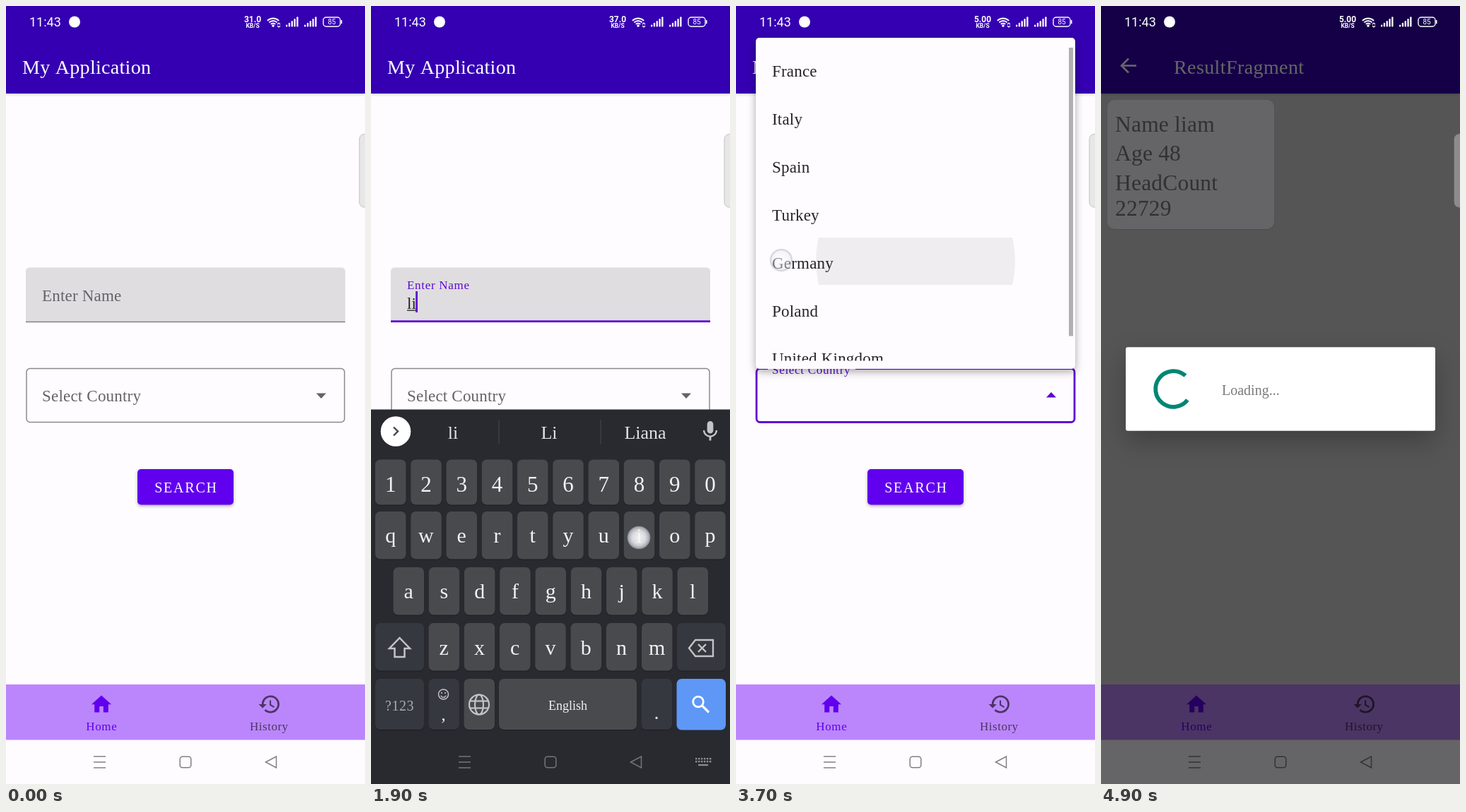
An HTML page with a canvas for the animation above (5 s loop, 508 by 1102 pixels).

```html
<!DOCTYPE html>
<html lang="en">
<head>
<meta charset="utf-8">
<title>Name search</title>
<style>
html, body { margin: 0; width: 100%; height: 100%; overflow: hidden; background: #fefcff; }
canvas { display: block; width: 508px; height: 1102px; }
</style>
</head>
<body>
<canvas id="stage"></canvas>
<script>
const W = 508, H = 1102, LOOP = 5000, STEP = 100;
const canvas = document.getElementById('stage');
const c = canvas.getContext('2d');
const ratio = window.devicePixelRatio || 1;
canvas.width = W * ratio;
canvas.height = H * ratio;

const SERIF = '"Liberation Serif", serif';
const SANS = 'Roboto, sans-serif';
const PAPER = '#fefcff', HEADER = '#3500b1', PURPLE = '#6000ee';
const FOCUS = '#5f08d2', GREY = '#656367', INK = '#252427', KEYICON = '#c3c4c7';
const NAME = 'liam';
const COUNTRIES = ['France', 'Italy', 'Spain', 'Turkey', 'Germany', 'Poland', 'United Kingdom'];
const TYPED_AT = [1700, 1900, 2100, 2300];

// x, y, first and last full-strength time; fades one step later
const TOUCHES = [
  [200, 415, 800, 900],
  [455, 831, 1700, 1700], [379, 753, 1900, 1900], [53, 831, 2100, 2100], [404, 910, 2300, 2300],
  [390, 1075, 2600, 2600], [250, 552, 3000, 3100], [64, 360, 3600, 3600], [254, 682, 4400, 4400]
];

const HOME = new Path2D('M10 20v-6h4v6h5v-8h3L12 3 2 12h3v8z');
const HISTORY = new Path2D('M13 3a9 9 0 0 0-9 9H1l3.9 3.9.1.1L9 12H6a7 7 0 1 1 2.06 4.94l-1.42 1.42A9 9 0 1 0 13 3zm-1 5v5l4.28 2.54.72-1.21-3.5-2.08V8z');
const MIC = new Path2D('M12 14a3 3 0 0 0 3-3V5a3 3 0 0 0-6 0v6a3 3 0 0 0 3 3zm5.3-3c0 3-2.54 5.1-5.3 5.1S6.7 14 6.7 11H5c0 3.4 2.7 6.2 6 6.7V21h2v-3.3c3.3-.5 6-3.3 6-6.7z');

const clamp = v => Math.max(0, Math.min(1, v));
const ramp = (t, a, b) => clamp((t - a) / (b - a));
const mix = (a, b, p) => a + (b - a) * p;
const typedName = t => NAME.slice(0, TYPED_AT.filter(at => t >= at).length);

function track(t, keys) {
  let value = keys[0][1];
  for (let i = 1; i < keys.length; i++) {
    const [a, from] = keys[i - 1], [b, to] = keys[i];
    if (t >= a) value = mix(from, to, ramp(t, a, b));
  }
  return value;
}

function text(s, x, y, size, color, o = {}) {
  c.font = `${o.weight || 400} ${size}px ${o.family || SERIF}`;
  c.letterSpacing = (o.gap || 0) + 'px';
  c.textAlign = o.align || 'left';
  c.fillStyle = color;
  c.fillText(s, x, y);
}

function rect(x, y, w, h, color) {
  c.fillStyle = color;
  c.fillRect(x, y, w, h);
}

function box(x, y, w, h, r, color) {
  c.beginPath();
  c.roundRect(x, y, w, h, r);
  c.fillStyle = color;
  c.fill();
}

function disc(x, y, r, color) {
  c.beginPath();
  c.arc(x, y, r, 0, 7);
  c.fillStyle = color;
  c.fill();
}

function ring(x, y, r, color, width) {
  c.beginPath();
  c.arc(x, y, r, 0, 7);
  stroke(color, width);
}

function stroke(color, width) {
  c.strokeStyle = color;
  c.lineWidth = width;
  c.stroke();
}

function line(points, color, width, close) {
  c.beginPath();
  for (let i = 0; i < points.length; i += 2) c.lineTo(points[i], points[i + 1]);
  if (close) c.closePath();
  stroke(color, width);
}

function icon(path, x, y, scale, color) {
  c.save();
  c.translate(x, y);
  c.scale(scale, scale);
  c.translate(-12, -12);
  c.fillStyle = color;
  c.fill(path);
  c.restore();
}

function shadowed(blur, dy, color, draw) {
  c.save();
  c.shadowColor = color;
  c.shadowBlur = blur * ratio;
  c.shadowOffsetY = dy * ratio;
  draw();
  c.restore();
}

function statusBar(t) {
  const speed = t < 900 ? '31.0' : t < 3100 ? '37.0' : '5.00';
  const white = '#fff';
  text('11:43', 33, 29, 18, white, { family: SANS });
  disc(97, 22.5, 8, white);
  text(speed, 349, 23, 12, white, { family: SANS, weight: 700, align: 'center' });
  text('KB/S', 349, 31, 8.5, white, { family: SANS, weight: 700, align: 'center' });
  for (const r of [4.5, 8, 11.5]) {
    c.beginPath();
    c.arc(378, 29, r, -Math.PI * 0.75, -Math.PI * 0.25);
    stroke(white, 2);
  }
  disc(378, 28, 1.8, white);
  line([384, 26, 386, 24, 388, 26], white, 1.2);
  line([384, 28, 386, 30, 388, 28], white, 1.2);
  for (const x of [396, 422])
    for (let i = 0; i < 5; i++) box(x + i * 3.8, 26.5 - i * 2.8, 2.3, 3 + i * 2.8, 1, white);
  c.beginPath();
  c.roundRect(449, 16, 24, 13, 4);
  stroke(white, 1.4);
  rect(474, 20, 1.5, 5, white);
  text('85', 461, 26.3, 10, white, { family: SANS, align: 'center' });
}

function header(result) {
  shadowed(4, 1, 'rgba(0,0,0,.2)', () => rect(0, 0, W, 124, HEADER));
  if (!result) return text('My Application', 23, 96, 28, '#fff', { gap: 0.3 });
  line([50, 84.5, 29, 84.5], '#fff', 2.6);
  line([39, 74.5, 29, 84.5, 39, 94.5], '#fff', 2.6);
  text('ResultFragment', 103, 96, 28, '#fff', { gap: 0.4 });
}

function floatLabel(s, p, y0, y1, color) {
  text(s, 51, mix(y0, y1, p), mix(23, 17, p), color, { gap: mix(0.2, 0.7, p) });
}

function nameField(t) {
  const focused = t >= 900 && t < 3200;
  const typed = typedName(t);
  box(28, 370.5, 452, 77.5, [5, 5, 0, 0], '#dfdde0');
  if (focused) rect(28, 445.3, 452, 2.8, FOCUS);
  else rect(28, 446.7, 452, 1.5, '#828083');
  floatLabel('Enter Name', ramp(t, 850, 1000), 417.5, 400.5, focused ? FOCUS : GREY);
  text(typed, 51, 429, 23, INK, { gap: 0.2 });
  const width = typed ? c.measureText(typed).width : 0;
  if (typed && t < 2700) rect(51, 430.5, width, 1.3, INK);
  if (focused) rect(51 + (typed ? Math.max(0, width - 1) : 0), 404, 2.8, 30, FOCUS);
}

function countryField(t) {
  const focused = t >= 3200;
  const lift = ramp(t, 3150, 3300);
  const color = focused ? FOCUS : GREY;
  c.beginPath();
  c.roundRect(29, 513.5, 450, 76, 5);
  stroke(focused ? FOCUS : '#8b898d', focused ? 2.8 : 1.5);
  if (lift) rect(mix(107, 45, lift), 511, 124 * lift, 6, PAPER);
  floatLabel('Select Country', lift, 560, 521, color);
  if (t >= 3800) text('Germany', 51, 561, 23, INK, { gap: 0.4 });
  const up = t >= 3200 && t < 3900;
  c.beginPath();
  c.moveTo(439, up ? 554.5 : 548.5);
  c.lineTo(453, up ? 554.5 : 548.5);
  c.lineTo(446, up ? 547 : 556);
  c.fillStyle = color;
  c.fill();
}

function searchButton(t) {
  shadowed(4, 2, 'rgba(0,0,0,.3)', () => box(186, 656, 136, 50.5, 5, PURPLE));
  if (t >= 4400) {
    c.save();
    c.beginPath();
    c.roundRect(186, 656, 136, 50.5, 5);
    c.clip();
    disc(254, 681, 45 + (t - 4400) * 0.4, 'rgba(255,255,255,.22)');
    c.restore();
  }
  text('SEARCH', 255, 688.5, 20, '#fff', { gap: 1.8, align: 'center' });
}

function dropdown(t) {
  const alpha = ramp(t, 3150, 3350) * (1 - ramp(t, 3800, 3950));
  if (!alpha) return;
  c.save();
  c.globalAlpha = alpha;
  shadowed(12, 4, 'rgba(0,0,0,.34)', () => box(28, 45, 452, 469, 5, PAPER));
  c.beginPath();
  c.rect(28, 58, 452, 444.5);
  c.clip();
  if (t >= 3700) {
    c.save();
    c.beginPath();
    c.rect(28, 328, 452, 67);
    c.clip();
    disc(254, 361, 141 + (t - 3700) * 1.4, '#efedf0');
    c.restore();
  }
  COUNTRIES.forEach((s, i) => text(s, 51, 100 + i * 67.9, 23, INK, { gap: 0.2 }));
  rect(471, 59, 6, 408.5, '#b1afb2');
  c.restore();
}

function tabs() {
  rect(0, 961, W, 78.5, '#bb86fc');
  icon(HOME, 135, 989.2, 1.4, PURPLE);
  text('Home', 135.3, 1026, 17, PURPLE, { gap: 0.6, align: 'center' });
  icon(HISTORY, 373, 989, 1.4, '#4b3565');
  text('History', 372.3, 1026, 17, '#4b3565', { gap: 0.5, align: 'center' });
}

function systemKeys(t) {
  const v = Math.round(track(t, [[1200, 128], [1300, 60], [1400, 26], [1700, 118],
    [2600, 118], [2700, 238], [2800, 244], [3100, 128]]));
  const color = `rgb(${v},${v},${v + 2})`;
  for (const y of [1063, 1071, 1079]) line([124, y, 141, y], color, 1.5);
  c.beginPath();
  c.roundRect(246.2, 1063.2, 15.6, 15.6, 3.5);
  stroke(color, 1.5);
  line([367.5, 1071, 382.5, 1063, 382.5, 1079], color, 1.5, true);
}

function key(x, y, w, h, color) {
  shadowed(1, 1, 'rgba(0,0,0,.3)', () => box(x, y, w, h, 7, color));
}

function keyRow(chars, x, y, h, base, size) {
  [...chars].forEach((ch, i) => {
    const left = x + i * 50.25;
    key(left, y, 43.5, h, '#484a4e');
    text(ch, left + 21.7, base, size, '#f2f2f3', { align: 'center' });
  });
}

function toolIcons() {
  c.lineJoin = 'round';
  line([90, 592, 111, 592, 111, 607, 104, 614, 90, 614], KEYICON, 2.8, true);
  line([111, 606, 103, 606, 103, 614], KEYICON, 2);
  disc(96, 599, 1.8, KEYICON);
  disc(104, 599, 1.8, KEYICON);
  c.beginPath();
  c.arc(99, 602, 5, 0.4, 2.7);
  stroke(KEYICON, 2);
  text('GIF', 172.5, 609.5, 20, KEYICON, { family: SANS, weight: 900, align: 'center', gap: 0.4 });
  c.beginPath();
  c.roundRect(234.5, 593.5, 20, 21.5, 2);
  stroke(KEYICON, 2.4);
  box(239, 590, 11, 7, 2, KEYICON);
  [[602, 250], [606, 250], [610, 247]].forEach(([y, x]) => line([239, y, x, y], KEYICON, 2));
  ring(316, 602.5, 6.7, KEYICON, 5.4);
  for (let i = 0; i < 6; i++) {
    const a = i * Math.PI / 3 + Math.PI / 6, x = Math.cos(a), y = Math.sin(a);
    line([316 + x * 7, 602.5 + y * 7, 316 + x * 12, 602.5 + y * 12], KEYICON, 6.5);
  }
  rect(361.5, 587, 1, 32, '#46484e');
  for (const x of [399, 406.5, 414]) disc(x, 602.5, 2.6, KEYICON);
}

function suggestions(t) {
  const typed = typedName(t);
  const cap = typed[0].toUpperCase() + typed.slice(1);
  [typed, cap, 'Liana'].forEach((s, i) =>
    text(s, 116 + i * 136, 613, 26, '#e2e2e4', { align: 'center' }));
  for (const x of [180.5, 324.5]) rect(x, 586, 1, 35, '#46484e');
}

function bottomRow() {
  const dark = '#35383e', soft = '#a9abaf';
  key(6, 953, 69, 72, dark);
  text('?123', 40.5, 998, 20, soft, { gap: 0.5, align: 'center' });
  key(81.5, 953, 43.5, 72, dark);
  ring(102.5, 975, 7, KEYICON, 1.5);
  disc(100, 973, 1.1, KEYICON);
  disc(105, 973, 1.1, KEYICON);
  c.beginPath();
  c.arc(102.5, 975.5, 3.8, 0.3, 2.85);
  stroke(KEYICON, 1.4);
  text(',', 102.5, 1012, 26, '#e6e6e8', { align: 'center' });
  key(131.5, 953, 43.5, 72, '#484a4e');
  ring(153, 989.5, 14, KEYICON, 2.2);
  c.beginPath();
  c.ellipse(153, 989.5, 6, 14, 0, 0, 7);
  stroke(KEYICON, 2.2);
  for (const y of [984.5, 994.5]) line([140, y, 166, y], KEYICON, 2.2);
  key(181, 953, 195, 72, '#484a4e');
  text('English', 278.5, 997, 18, '#f0f0f1', { align: 'center' });
  key(382.5, 953, 43.5, 72, dark);
  text('.', 404, 1010, 28, '#e6e6e8', { align: 'center' });
  box(432.5, 953, 69.5, 72.5, 7, '#5e97f6');
  ring(463, 985.5, 7.3, '#fff', 2.8);
  line([468, 990.5, 478, 1000.5], '#fff', 3.2);
}

function keyboard(t) {
  const rise = Math.pow(1 - ramp(t, 1220, 1439), 3);
  const fall = Math.pow(ramp(t, 2620, 2780), 2);
  const drop = 531 * Math.max(rise, fall);
  if (drop >= 531) return;
  const suggest = t >= TYPED_AT[0];
  c.save();
  c.translate(0, drop);
  rect(0, 571.5, W, 540, '#282a30');
  disc(35, 602.5, 21.3, '#fff');
  const tip = suggest ? 3 : -3;
  line([35 - tip, 596.5, 35 + tip, 602.5, 35 - tip, 608.5], '#44464a', 2.4);
  suggest ? suggestions(t) : toolIcons();
  icon(MIC, 480, 602.5, 1.45, KEYICON);

  keyRow('1234567890', 6, 642.5, 64, 688, 31);
  keyRow('qwertyuiop', 6, 716, 67.5, 760, 30);
  keyRow('asdfghjkl', 31.5, 795, 67.5, 839, 30);
  keyRow('zxcvbnm', 81.5, 874, 67.5, 918.5, 30);
  key(6, 874, 69, 67.5, '#35383e');
  line([40.5, 895, 55, 910, 47.5, 910, 47.5, 922, 33.5, 922, 33.5, 910, 26, 910], KEYICON, 2.5, true);
  key(433, 874, 69, 67.5, '#35383e');
  line([450, 909.5, 459, 898, 484, 898, 484, 921, 459, 921], KEYICON, 2.4, true);
  line([463, 904, 474, 915], KEYICON, 2.4);
  line([474, 904, 463, 915], KEYICON, 2.4);
  bottomRow();

  c.globalAlpha = ramp(t, 1400, 1700);
  for (let row = 0; row < 2; row++)
    for (let i = 0; i < 6; i++) rect(459 + i * 4, 1065 + row * 4, 2.4, 2.4, '#8c8e92');
  rect(463, 1074, 14, 2.2, '#8c8e92');
  c.restore();
}

function resultScreen(t) {
  rect(0, 124, W, 837, '#d7d5d9');
  header(true);
  if (t < 4800) return;
  shadowed(2, 1, 'rgba(0,0,0,.12)', () => box(9, 133, 236, 183, 10, '#fdfaff'));
  ['Name ' + NAME, 'Age 48', 'HeadCount', '22729'].forEach((s, i) =>
    text(s, 20, [177.5, 219, 260.5, 296.5][i], 31.5, '#7c7a7e', { gap: 0.2 }));
}

function loading(t) {
  const alpha = ramp(t, 4500, 4700);
  if (!alpha) return;
  rect(0, 0, W, H, `rgba(0,0,0,${0.6 * alpha})`);
  c.save();
  c.globalAlpha = alpha;
  shadowed(36, 14, 'rgba(0,0,0,.26)', () => box(35, 483.3, 438, 118.5, 3, '#fff'));
  const rad = Math.PI / 180;
  const start = 38 + (t - 4900) * 0.3;
  const sweep = Math.max(20, 274 - (4900 - t));
  c.beginPath();
  c.arc(102.5, 542.5, 25.3, start * rad, (start + sweep) * rad);
  stroke('#008673', 5.8);
  text('Loading...', 171, 550.5, 20, '#7b7a7c');
  c.restore();
}

function sideTab() {
  c.beginPath();
  c.roundRect(500, 181.5, 20, 103.5, 7);
  c.fillStyle = 'rgba(204,204,204,.46)';
  c.fill();
  stroke('rgba(150,150,150,.5)', 1);
}

function touch(t) {
  for (const [x, y, from, to] of TOUCHES) {
    if (t < from || t > to + STEP) continue;
    c.save();
    c.globalAlpha = t > to ? 0.55 : 1;
    const g = c.createRadialGradient(x, y, 2, x, y, 15);
    g.addColorStop(0, 'rgba(250,250,252,.92)');
    g.addColorStop(0.55, 'rgba(240,240,243,.88)');
    g.addColorStop(1, 'rgba(225,225,230,.65)');
    disc(x, y, 15, g);
    ring(x, y, 15, 'rgba(170,170,186,.75)', 2.6);
    c.restore();
  }
}

function draw(t) {
  c.setTransform(ratio, 0, 0, ratio, 0, 0);
  c.lineJoin = 'miter';
  rect(0, 0, W, H, PAPER);
  if (t >= 4500) {
    resultScreen(t);
  } else {
    header(false);
    nameField(t);
    countryField(t);
    searchButton(t);
  }
  tabs();
  dropdown(t);
  keyboard(t);
  systemKeys(t);
  loading(t);
  statusBar(t);
  sideTab();
  touch(t);
}

const begin = performance.now();
function tick() {
  const t = (performance.now() - begin) % LOOP;
  draw(Math.floor(t / STEP) * STEP);
  requestAnimationFrame(tick);
}
tick();
</script>
</body>
</html>
```
